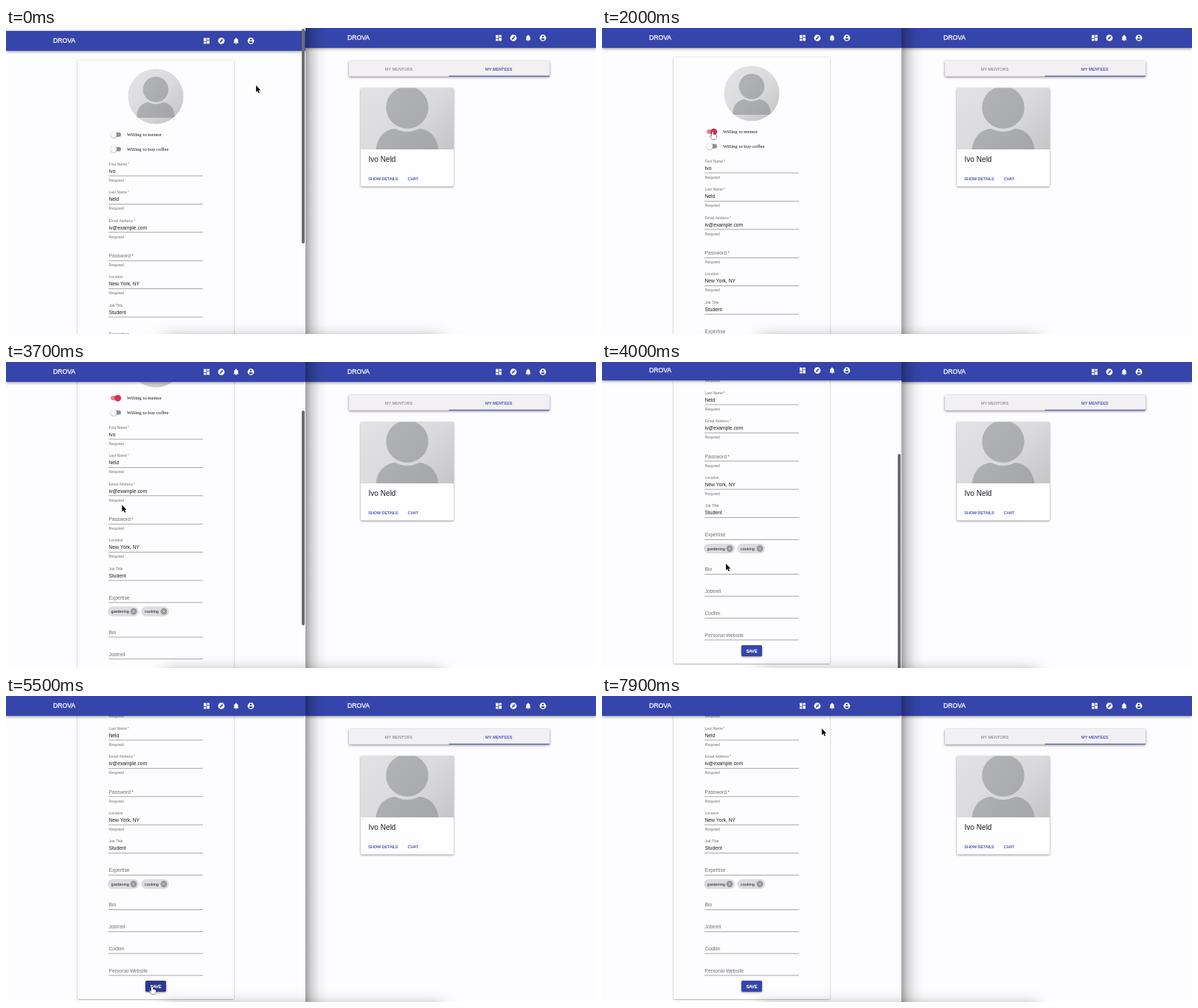
An HTML page with a canvas that plays this animation: 800 px wide and 416 px high, repeating every 8000 ms.

```html
<!DOCTYPE html>
<html lang="en">
<head>
<meta charset="utf-8">
<title>Profile settings</title>
<style>
html, body { margin: 0; width: 100%; height: 100%; overflow: hidden; background: #fdfcfe; }
canvas { display: block; width: 800px; height: 416px; }
</style>
</head>
<body>
<canvas id="stage"></canvas>
<script>
const W = 800, H = 416, LOOP = 8000, STEP = 100;
const SPLIT = 406, MAX_SCROLL = 175.5, THUMB = 291;
const SANS = '"Liberation Sans", Arial, sans-serif';
const SERIF = '"Liberation Serif", "Times New Roman", serif';
const BLUE = '#3545ab', INK = '#1c1c20', GREY = '#717076', PAGE = '#fdfcfe';
const BRAND = 'DROVA', FIRST = 'Ivo', LAST = 'Neld';

const canvas = document.getElementById('stage');
const ctx = canvas.getContext('2d');
const dpr = window.devicePixelRatio || 1;
canvas.width = W * dpr;
canvas.height = H * dpr;

// Tracks: [time, value...]
const SCROLL = [[0, -4], [100, -3], [200, -1.5], [300, 0], [3400, 0], [3500, 4], [3600, 40],
  [3700, 92], [3800, 143], [3900, 173], [4000, 177.5], [4300, MAX_SCROLL]];
const BAR = [[0, 1], [200, 1], [500, .06], [600, 0], [3500, 0], [3600, 1], [4500, 1], [4800, 0]];
const POINTER = [[0, 339, 78], [100, 325, 85], [500, 162, 145], [1200, 150, 141], [3500, 150, 141],
  [4000, 168, 274], [4400, 170, 280], [5200, 198, 395], [5900, 198, 395], [6600, 300, 63],
  [6800, 300, 63], [7200, 298, 52], [7500, 298, 52], [7800, 298, 44]];
const TOGGLE = [[1400, 0], [1600, 1]];
const DIALOG_OPEN = 5800, DIALOG_CLOSE = 7500;

function at(track, t) {
  const i = track.findIndex(k => k[0] > t);
  if (i === 0) return track[0].slice(1);
  if (i < 0) return track[track.length - 1].slice(1);
  const a = track[i - 1], b = track[i], f = (t - a[0]) / (b[0] - a[0]);
  return a.slice(1).map((v, n) => v + (b[n + 1] - v) * f);
}

function text(s, x, y, size, color, o = {}) {
  ctx.font = `${o.bold ? 'bold ' : ''}${size}px ${o.font || SANS}`;
  ctx.textAlign = o.align || 'left';
  ctx.fillStyle = color;
  ctx.fillText(s, x, y + size * .35);
  if (o.heavy) {
    ctx.strokeStyle = color;
    ctx.lineWidth = o.heavy;
    ctx.strokeText(s, x, y + size * .35);
  }
}

function box(x, y, w, h, r, color, shadow) {
  ctx.save();
  if (shadow) {
    ctx.shadowOffsetY = shadow[0] * dpr;
    ctx.shadowBlur = shadow[1] * dpr;
    ctx.shadowColor = `rgba(0,0,0,${shadow[2]})`;
  }
  ctx.fillStyle = color;
  ctx.beginPath();
  ctx.roundRect(x, y, w, h, r);
  ctx.fill();
  ctx.restore();
}

function disc(x, y, r, color) {
  ctx.fillStyle = color;
  ctx.beginPath();
  ctx.arc(x, y, r, 0, 7);
  ctx.fill();
}

// Icons are drawn on a 24-unit grid centred on 0,0.
const icons = [
  () => {
    for (const [x, y, h] of [[-9, -9, 10], [-9, 3, 6], [1, -1, 10], [1, -9, 6]]) ctx.fillRect(x, y, 8, h);
  },
  () => {
    disc(0, 0, 10, '#fff');
    ctx.fillStyle = BLUE;
    ctx.fill(new Path2D('M2.2 2.2L-6 6L-2.2 -2.2L6 -6Z'));
    disc(0, 0, 1.1, '#fff');
  },
  () => {
    ctx.fill(new Path2D('M-8 7V6L-6 4V-1C-6 -4 -4.4 -6.6 -1.5 -7.3V-8A1.5 1.5 0 0 1 1.5 -8V-7.3C4.4 -6.6 6 -4 6 -1V4L8 6V7Z'));
    ctx.fill(new Path2D('M-2 8H2A2 2 0 0 1 -2 8Z'));
  },
  () => {
    disc(0, 0, 10, '#fff');
    disc(0, -4, 3, BLUE);
    ctx.fill(new Path2D('M-6 4C-6 2 -2 .9 0 .9S6 2 6 4C3.3 8.2 -3.3 8.2 -6 4Z'));
  }
];

function header(x, y, w) {
  box(x, y - (y < 0 ? 0 : 0), w, 27, 0, BLUE, [1.2, 4, .45]);
  text(BRAND, x + 64 - (x ? 7 : 0), y + 13.3, 8.65, '#fff', { heavy: .3 });
  icons.forEach((draw, i) => {
    ctx.save();
    ctx.translate(x + 272 - (x ? 10 : 0) + i * 20, y + 13.5);
    ctx.scale(.44, .44);
    ctx.fillStyle = '#fff';
    draw();
    ctx.restore();
  });
}

// Placeholder portrait; k scales it around the head centre.
function portrait(x, y, k, clip) {
  ctx.save();
  ctx.beginPath();
  clip();
  ctx.clip();
  ctx.translate(x, y);
  ctx.scale(k, k);
  const g = ctx.createLinearGradient(-50, -40, 50, 65);
  g.addColorStop(0, '#e3e2e4');
  g.addColorStop(.55, '#dad9db');
  g.addColorStop(1, '#c6c5c8');
  ctx.fillStyle = g;
  ctx.fillRect(-90, -90, 180, 200);
  const skin = ctx.createLinearGradient(-30, 0, 40, 60);
  skin.addColorStop(0, '#b0b1b4');
  skin.addColorStop(1, '#a5a6a9');
  ctx.fillStyle = skin;
  ctx.fill(new Path2D('M-43 62C-42 42 -32 31 -18 29H18C32 31 42 42 43 62V64H-43Z'));
  disc(0, 0, 33, g);
  disc(0, 0, 28.7, skin);
  ctx.restore();
}

function toggle(y, on) {
  box(142, y - 2.9, 14, 5.8, 2.9, on > .5 ? '#ec7d98' : '#918f94');
  const x = 146 + 5.6 * on;
  box(x - 4.2, y - 4.2, 8.4, 8.4, 4.2, on > .5 ? '#e32a50' : '#f9f8fa', [.5, 1.5, .4]);
}

function rule(y) {
  ctx.fillStyle = '#929095';
  ctx.fillRect(139, y - .4, 128, .8);
}

function field(y, label, value, required) {
  if (value) {
    text(label, 139.5, y - 16, 5.04, GREY);
    text(value, 139.5, y - 6.5, 6.72, INK);
  } else {
    text(label, 139.5, y - 6.6, 6.72, GREY);
  }
  rule(y);
  if (required) text('Required', 139.5, y + 6, 5.04, GREY);
}

function chip(x, w, label) {
  box(x, 424.5, w, 13.3, 6.65, '#dcdbde');
  text(label, x + 4.6, 431.2, 5.46, INK);
  const cx = x + w - 7;
  disc(cx, 431.1, 4.3, '#949397');
  ctx.strokeStyle = '#dcdbde';
  ctx.lineWidth = .8;
  ctx.beginPath();
  for (const s of [-1, 1]) {
    ctx.moveTo(cx - 1.8, 431.1 - 1.8 * s);
    ctx.lineTo(cx + 1.8, 431.1 + 1.8 * s);
  }
  ctx.stroke();
}

function form(on, hover) {
  box(97, 40, 212, 547.5, 1.5, PAGE, [.6, 2, .45]);
  portrait(203, 79.5, .603, () => ctx.arc(203, 89, 37.6, 0, 7));
  toggle(141, on);
  toggle(160.7, 0);
  text('Willing to mentor', 164, 140.2, 6.62, '#111', { font: SERIF });
  text('Willing to buy coffee', 164, 160.2, 6.62, '#111', { font: SERIF });
  field(197, 'First Name\u2009*', FIRST, true);
  field(235.5, 'Last Name\u2009*', LAST, true);
  field(273.8, 'Email Address\u2009*', 'iv@example.com', true);
  field(312.3, 'Password\u2009*', '', true);
  field(350.6, 'Location', 'New York, NY', true);
  field(389, 'Job Title', 'Student');
  field(419, 'Expertise');
  chip(138, 42, 'gardening');
  chip(183.5, 37.5, 'cooking');
  ['Bio', 'Jobtrell', 'Codlim', 'Personal Website'].forEach((s, i) => field(466 + i * 29.8, s));
  box(189, 562.5, 28, 15, 1.7, hover ? '#2b3990' : BLUE, [1, 2.5, .45]);
  text('SAVE', 203, 570, 5.8, '#fff', { align: 'center', heavy: .3 });
}

function leftPage(scroll, bar, on, hover) {
  const bounce = scroll < 0 ? -scroll : Math.min(0, MAX_SCROLL - scroll);
  ctx.save();
  ctx.beginPath();
  ctx.rect(0, 0, SPLIT, H);
  ctx.clip();
  ctx.fillStyle = PAGE;
  ctx.fillRect(0, 0, SPLIT, H);
  ctx.save();
  ctx.translate(0, -scroll);
  form(on, hover);
  ctx.restore();
  header(0, bounce, SPLIT);
  if (bar > 0) {
    const part = Math.max(0, Math.min(1, scroll / MAX_SCROLL));
    ctx.globalAlpha = bar;
    box(401, 1 + part * (H - THUMB - 1), 4, THUMB + 1, 2, '#6c6b70');
  }
  ctx.restore();
}

function rightPage() {
  ctx.fillStyle = PAGE;
  ctx.fillRect(SPLIT, 0, W - SPLIT, H);
  header(SPLIT, 0, W - SPLIT);

  box(465, 45, 272, 20.7, 1.5, '#f2f0f3', [1, 3.5, .5]);
  text('MY MENTORS', 532.6, 55.6, 5.5, GREY, { align: 'center' });
  text('MY MENTEES', 668.3, 55.6, 5.5, BLUE, { align: 'center', heavy: .12 });
  ctx.fillStyle = BLUE;
  ctx.fillRect(600.5, 64.8, 136.5, 1);

  box(481, 81.5, 126, 134, 1.7, '#fefdff', [.8, 2.5, .5]);
  portrait(544, 108, 1, () => ctx.roundRect(481, 81.5, 126, 83.5, [1.7, 1.7, 0, 0]));
  text(`${FIRST} ${LAST}`, 491.5, 178.5, 10.08, INK);
  text('SHOW DETAILS', 491.3, 205.6, 5.4, BLUE, { heavy: .15 });
  text('CHAT', 544.8, 205.6, 5.4, BLUE, { heavy: .15 });

  const g = ctx.createLinearGradient(SPLIT, 0, SPLIT + 30, 0);
  g.addColorStop(0, 'rgba(0,0,0,.36)');
  g.addColorStop(.25, 'rgba(0,0,0,.18)');
  g.addColorStop(.6, 'rgba(0,0,0,.05)');
  g.addColorStop(1, 'rgba(0,0,0,0)');
  ctx.fillStyle = g;
  ctx.fillRect(SPLIT, 0, 30, H);
}

function dialog() {
  box(78, -6, 250, 77, 2, '#fefefe', [3, 12, .5]);
  text('localhost:3001 says', 87, 13.3, 8.5, '#2c2c30');
  text('Your profile has been updated!', 87, 30, 7.5, '#55555a');
  box(283, 44, 36, 18, 2, '#3a7cf0');
  text('OK', 301, 53, 6.9, '#fff', { align: 'center', bold: true });
}

const ARROW = new Path2D('M0 0V9.2L2.1 7.3L3.6 10.6L5.1 9.9L3.7 6.7H6.4Z');
const HAND = new Path2D('M-1 .8Q0 -.8 1 .8V3.8Q2 3.2 2.6 4.1Q3.6 3.6 4.1 4.5Q5.2 4.2 5.3 5.4V7.4L4.3 10H-.8L-3.3 6.6Q-3.7 5.4 -2.4 5.5L-1 6.8Z');

function pointer(x, y, hand) {
  ctx.save();
  ctx.translate(x, y);
  ctx.lineJoin = 'round';
  ctx.lineWidth = hand ? .9 : 1.3;
  ctx.strokeStyle = hand ? '#111' : '#fff';
  ctx.fillStyle = hand ? '#fff' : '#111';
  ctx.stroke(hand ? HAND : ARROW);
  ctx.fill(hand ? HAND : ARROW);
  ctx.restore();
}

function draw(t) {
  ctx.setTransform(dpr, 0, 0, dpr, 0, 0);
  const [scroll] = at(SCROLL, t), [bar] = at(BAR, t), [on] = at(TOGGLE, t);
  const [x, y] = at(POINTER, t);
  const modal = t >= DIALOG_OPEN && t < DIALOG_CLOSE;
  const onSave = t > 4300 && t < DIALOG_OPEN && x > 189 && x < 217 && y > 386 && y < 403;
  const onSwitch = t < 3600 && x > 141 && x < 157 && y > 135 && y < 147;

  rightPage();
  leftPage(scroll, bar, on, onSave || modal);
  box(214, H + 6, 378, 20, 6, '#888', [0, 20, .45]);
  if (modal) dialog();
  pointer(x, y, onSave || onSwitch);
}

function tick(now) {
  draw(Math.floor((now % LOOP) / STEP) * STEP);
  requestAnimationFrame(tick);
}
requestAnimationFrame(tick);
</script>
</body>
</html>
```
